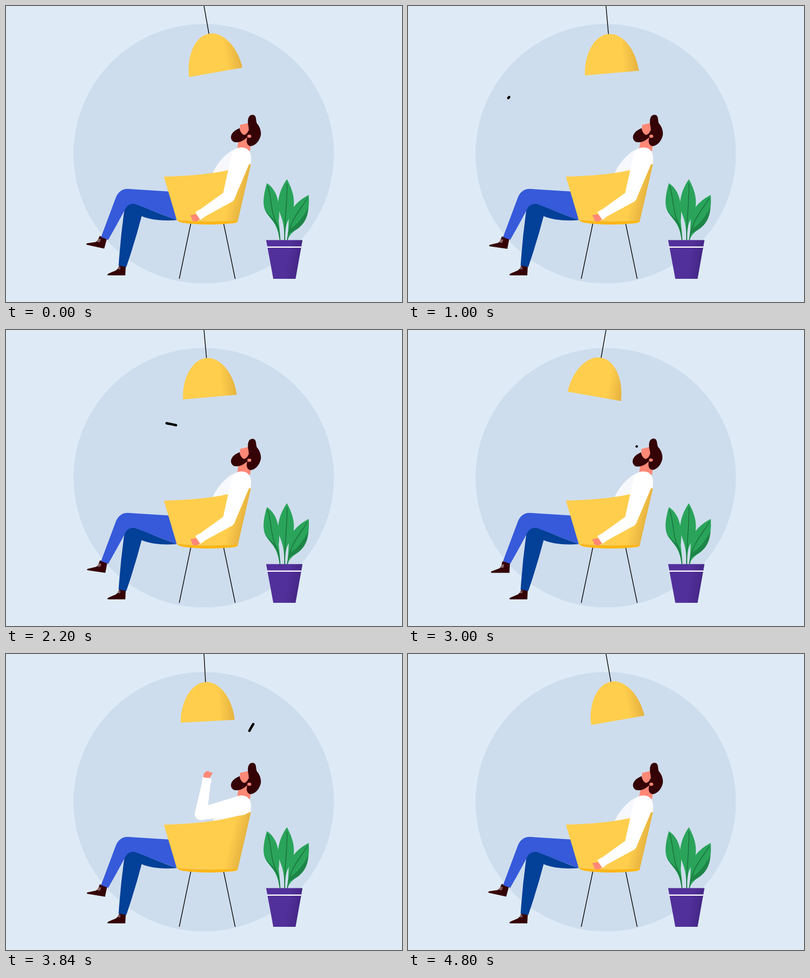
An HTML page for the animation above (4.84 s loop, 800 by 600 pixels).

```html
<!DOCTYPE html>
<html lang="en">
<head>
<meta charset="utf-8">
<title>Man in a chair</title>
<style>
  html, body { margin: 0; width: 100%; height: 100%; overflow: hidden; background: #deebf6; }
  svg { display: block; width: 800px; height: 600px; }
</style>
</head>
<body>
<svg viewBox="0 0 800 600">
  <defs>
    <linearGradient id="lampFill" gradientUnits="userSpaceOnUse" x1="424" y1="0" x2="455" y2="0">
      <stop offset="0" stop-color="#ffce4d"/><stop offset="1" stop-color="#e5b23f"/>
    </linearGradient>
    <linearGradient id="chairFill" gradientUnits="userSpaceOnUse" x1="452" y1="379" x2="483" y2="386">
      <stop offset="0" stop-color="#ffce4d"/><stop offset="1" stop-color="#e5b23f"/>
    </linearGradient>
    <linearGradient id="potFill" gradientUnits="userSpaceOnUse" x1="568" y1="512" x2="593" y2="516">
      <stop offset="0" stop-color="#52309b"/><stop offset="1" stop-color="#452786"/>
    </linearGradient>
  </defs>

  <rect width="800" height="600" fill="#deebf6"/>
  <circle cx="399.5" cy="299.5" r="263" fill="#cedded"/>

  <g id="lamp">
    <path d="M400 -20V58" stroke="#111" stroke-width="1.6"/>
    <path d="M345.4 136.6C347 96 370 57 400 57C430 57 453 96 454.6 136.6Z" fill="url(#lampFill)"/>
  </g>

  <g id="plant">
    <g fill="#2aa45a">
      <path d="M527 359C518 390 518 409 528 422C538 435 549 444 553 475H554.5C554 460 552 447 551 436C554 412 552 375 527 359Z"/>
      <path d="M567.5 351C551 375 546 401 553 419C559 435 563 447 562 475H564C564 450 566 441 572 431C580 419 582 408 581.5 395C581 380 575 365 567.5 351Z"/>
      <path d="M611.5 383C590 394 574 411 571.5 430C570 447 571 456 567.5 475H569C572 463 580 458 591 450C608 436 614 409 611.5 383Z"/>
    </g>
    <path d="M610 388C597 412 579 437 571 462C576 458 583 456 591 450C605 439 610 425 611 408C595 437 583 446 573 453Z" fill="#1d8547"/>
    <path d="M523 411C529 425 538 433 545 443C550 452 552 463 553.5 475C552 455 548 443 541 432C533 425 527 420 523 411Z" fill="#1d8547"/>
    <g fill="none" stroke="#176c3a" stroke-width="1.4">
      <path d="M528.5 365C537 387 534 419 547 441C551 452 552 464 553.5 475"/>
      <path d="M567.5 360C569 396 563 417 563 475"/>
      <path d="M609 389C596 412 574 430 568.5 474"/>
    </g>
    <path d="M525.5 474.5H599L585 553H540Z" fill="url(#potFill)"/>
    <path d="M527.5 488.7H596.5" stroke="#fff" stroke-width="2.6"/>
  </g>

  <path d="M373.5 440L350 553M439.5 440L463 553" stroke="#111" stroke-width="1.6"/>

  <g id="legs">
    <g id="foot">
      <path d="M190.5 469L206 471L205 492.3H168.5Q165.5 490 172 488L185 483Q189 479 190.5 469Z" fill="#350206"/>
      <path d="M187 476.5L194 476M186 478.5L194 478.5M184.500 480.5L193 481" stroke="#e8dcdc"/>
    </g>
    <path d="M330 376L247 370.8C236 370 227 376 222 388L192 468.5L206.5 474Q222 447 238 417L262 402L345 434Z" fill="#365ada"/>
    <path d="M229 525L242 527L241 546H206Q202.5 544 209 541.5L222 536Q227 532 229 525Z" fill="#350206"/>
    <path d="M225 530L231 529.5M224 532.5L231 532.5" stroke="#e8dcdc"/>
    <path d="M345 434C318 436 294 434 274 426Q260.5 478 243 529L227.5 526Q231 473 238 421Q241 402 257 401C264 401 284 411 345 434Z" fill="#034098"/>
  </g>

  <g id="head">
    <path d="M470 272L467 289L493 294L496 270L484 258Z" fill="#ff8876"/>
    <path d="M473 241L490 237L493 258L483 266L472 260Z" fill="#ff8876"/>
    <path d="M472 247.5Q473 258 481 261.5Q487 260 490 252L495 260Q487 267 480 272Q470 278 460 275.5C453 271 453 263 458 257C463 251 468 250 472 247.5Z" fill="#350206"/>
    <path d="M489 240C488 231 489 221 498 220.5C507 221 504 231 507 238C514 246 516 256 514.5 263C511 276 502 284 494 284C487 283 485 275 487 268L490 260Q491.5 250 489 240Z" fill="#350206"/>
    <ellipse cx="491.5" cy="264" rx="4" ry="3.2" fill="#ff8876"/>
  </g>

  <path d="M415 345C425 317 450 291 472 287C487 285 495 294 495 308V322L470 345Z" fill="#f6f8fd"/>
  <path d="M319 345.7C380 344.5 440 339 495 320L468.5 435Q468 438 463 438L345 434Z" fill="url(#chairFill)"/>
  <path d="M345 433.5C380 437 430 437 468.5 435.5Q468 439 462 440Q405 446 357 439.5Q349 438 345 433.5Z" fill="#ffb716"/>

  <g id="arm" fill="#fff">
    <path id="upper"/>
    <g id="fore">
      <path d="M72 -7C77 -9 82 -9 86 -5C90 -1 87 5 82 6L76 6Z" fill="#ff8876"/>
      <path d="M74 4L84 9Q88 9 86 4L80 0Z" fill="#ff8876"/>
      <circle r="12.5"/>
      <path d="M0 -12.5L66 -8.5V8.5L0 12.5Z"/>
      <path d="M64 -9.3H74V9.3H64Z"/>
    </g>
  </g>

  <path id="fly" fill="none" stroke="#000" stroke-width="5" stroke-linecap="round" stroke-linejoin="round"/>
</svg>
<script>
const LOOP = 4840, STEP = 40, SWING = 1200, TRAIL = 80;
const SHOULDER = { x: 475, y: 307, r: 20 }, ELBOW_R = 12.5, UPPER_LEN = 83;
const $ = id => document.getElementById(id);
const lamp = $('lamp'), foot = $('foot'), head = $('head');
const upper = $('upper'), fore = $('fore'), fly = $('fly');

const linear = p => p;
const easeIn = p => p * p;
const easeOut = p => p * (2 - p);
const smooth = p => p * p * (3 - 2 * p);
const mix = (a, b, p) => a + (b - a) * p;
const span = (t, from, to) => Math.max(0, Math.min(1, (t - from) / (to - from)));
const ramp = (t, from, to) => smooth(span(t, from, to));

// The fly enters, drifts to the nose, rests, takes off, darts away
const NOSE = [462, 236];
const FLIGHT = [
  { from: 0, to: 1080, ease: easeOut, curve: [[-30, 128], [60, 140], [170, 225], [205, 184]] },
  { from: 1080, to: 2860, ease: smooth, curve: [[205, 184], [250, 190], [307, 163], NOSE] },
  { from: 3220, to: 4160, ease: linear, curve: [NOSE, [463, 219], [500, 113], [533, 113]] },
  { from: 4160, to: 4680, ease: easeIn, curve: [[533, 113], [570, 118], [650, 110], [830, 80]] }
];

function bezier([a, b, c, d], p) {
  const q = 1 - p;
  return [0, 1].map(k =>
    q * q * q * a[k] + 3 * q * q * p * b[k] + 3 * q * p * p * c[k] + p * p * p * d[k]);
}

function flightAt(t) {
  const leg = FLIGHT.findLast(l => t >= l.from) || FLIGHT[0];
  return bezier(leg.curve, leg.ease(span(t, leg.from, leg.to)));
}

function drawFly(t) {
  const pts = [];
  for (let i = 8; i >= 0; i--) {
    pts.push(flightAt(t - TRAIL * i / 8).map(v => v.toFixed(2)).join(' '));
  }
  fly.setAttribute('d', 'M' + pts.join('L'));
}

function poseArm(p) {
  const a = mix(107.6, 186.9, p) * Math.PI / 180;
  const { x, y, r } = SHOULDER;
  const ex = x + UPPER_LEN * Math.cos(a), ey = y + UPPER_LEN * Math.sin(a);
  const lean = Math.acos((r - ELBOW_R) / UPPER_LEN);
  const rim = (cx, cy, cr, side) => {
    const b = a + side * lean;
    return `${(cx + cr * Math.cos(b)).toFixed(2)} ${(cy + cr * Math.sin(b)).toFixed(2)}`;
  };
  upper.setAttribute('d',
    `M${rim(x, y, r, -1)}L${rim(ex, ey, ELBOW_R, -1)}` +
    `A${ELBOW_R} ${ELBOW_R} 0 0 1 ${rim(ex, ey, ELBOW_R, 1)}` +
    `L${rim(x, y, r, 1)}A${r} ${r} 0 1 1 ${rim(x, y, r, -1)}Z`);
  fore.setAttribute('transform', `translate(${ex} ${ey}) rotate(${mix(147.7, 320.7, p)})`);
}

function draw(t) {
  const wave = u => Math.cos(u / SWING * 2 * Math.PI);
  const nod = -1.9 * ramp(t, 2760, 2920) + 3.4 * ramp(t, 3160, 3400) - 1.5 * ramp(t, 3520, 3800);
  lamp.setAttribute('transform', `rotate(${-10 * wave(t)} 400 0)`);
  foot.setAttribute('transform', `rotate(${6.3 * (1 + wave(t - STEP))} 204 462)`);
  head.setAttribute('transform', `rotate(${nod} 482 288)`);
  poseArm(ramp(t, 3080, 3400) - ramp(t, 3600, 4360));
  drawFly(t);
}

const start = performance.now();
function tick() {
  const t = (performance.now() - start) % LOOP;
  draw(Math.floor(t / STEP) * STEP);
  requestAnimationFrame(tick);
}
tick();
</script>
</body>
</html>
```
